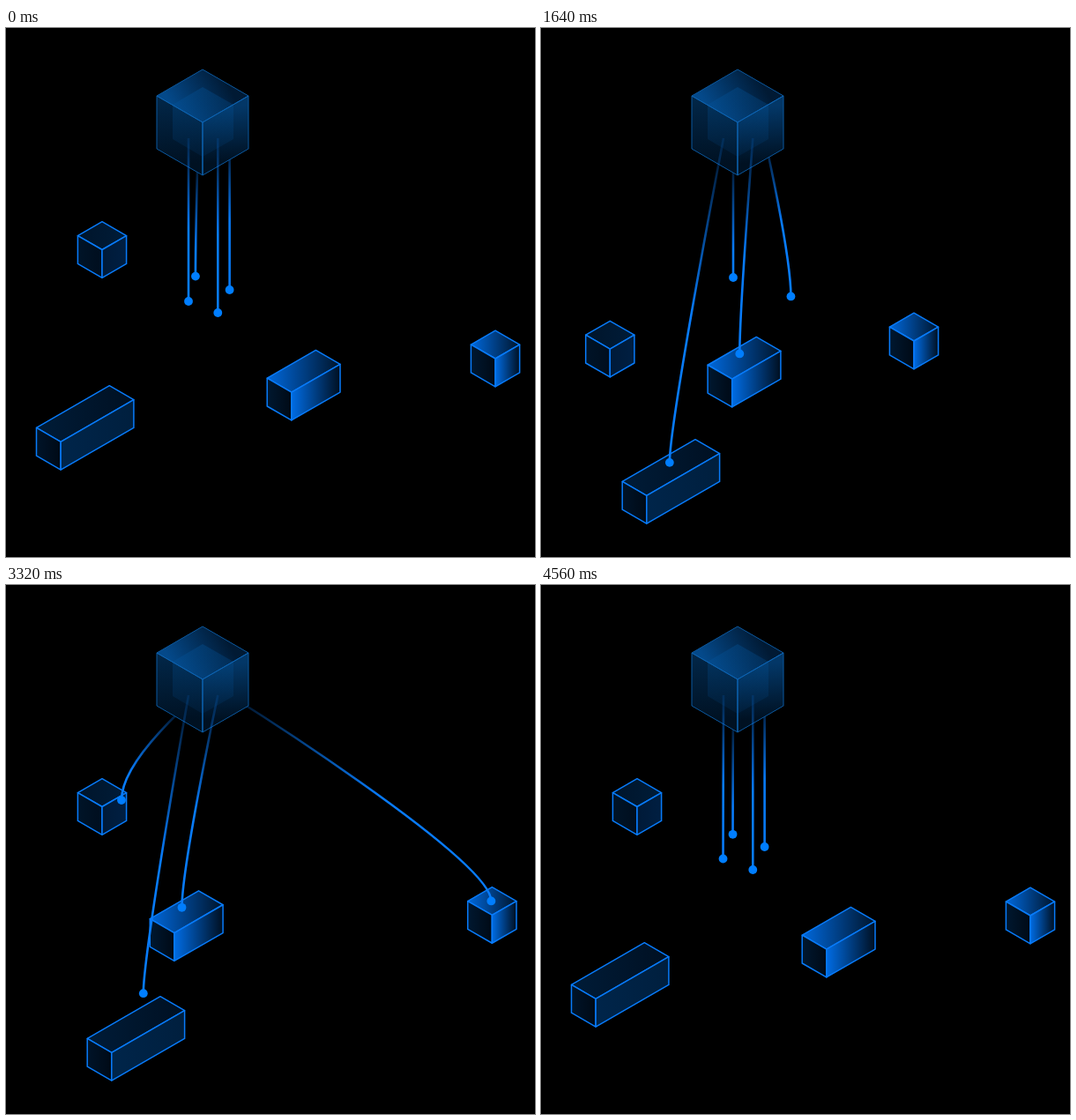
Write an HTML page with a canvas that moves like this. It is 600x600 px and loops after 4.6 s.

```html
<!DOCTYPE html>
<html lang="en">
<head>
<meta charset="utf-8">
<title>Cube with four arms</title>
<style>
  html, body { margin: 0; width: 100%; height: 100%; overflow: hidden; background: #000; }
  canvas { display: block; width: 600px; height: 600px; }
</style>
</head>
<body>
<canvas id="stage" width="600" height="600"></canvas>
<script>
const ctx = document.getElementById('stage').getContext('2d');
const LOOP = 4600;
const BLUE = '#087bfa';
const ROOT_Y = 125;

// Box faces: gradient stops from the left end to the right end
const DIM = { top: ['#00152b', '#001c38'], left: ['#001428', '#000e1e'], right: ['#001a38', '#001f42'] };
const LONG = { top: ['#001c38', '#001022'], left: ['#001429', '#000a16'], right: ['#00254a', '#001f3e'] };
const BRIGHT = { top: ['#0068dc', '#00142a'], left: ['#001830', '#000a16'], right: ['#006ce4', '#000f20'] };

// times: start and end of reach, carry, return (out), then the same (back)
const arms = [
  { rest: [218, 283], fade: [.15, .8], from: [109, 219.7], to: [78.3, 332.3], grip: [-1.7, 13.8],
    cells: 1, skin: DIM, back: true,
    times: [-65, 495, 568, 1018, 1018, 1486, 1965, 2525, 2716, 3166, 3166, 3640] },
  { rest: [253.6, 297], fade: [0, .55], from: [555, 343.2], to: [423, 323.2], grip: [-1, 15.8],
    cells: 1, skin: BRIGHT, back: true,
    times: [96, 656, 686, 1266, 1266, 1800, 2300, 2860, 2880, 3380, 3382, 3902] },
  { rest: [207, 310], fade: [0, .55], from: [117.3, 405.7], to: [175, 466.7], grip: [-31, 31.7],
    cells: 3, skin: LONG,
    times: [326, 976, 1046, 1586, 1586, 2040, 2960, 3480, 3654, 4194, 4194, 4578] },
  { rest: [240.3, 323], fade: [0, .55], from: [351.4, 365.4], to: [218.2, 346.8], grip: [-19, 19],
    cells: 2, skin: BRIGHT,
    times: [640, 1200, 1270, 1810, 1810, 2380, 2836, 3276, 3303, 3863, 3880, 4380] }
];

const mix = (a, b, k) => a.map((v, i) => v + (b[i] - v) * k);

function ramp(t, start, end) {
  const p = Math.min(1, Math.max(0, (t - start) / (end - start)));
  return p < .5 ? 2 * p * p : 1 - 2 * (1 - p) ** 2;
}

function gradient(a, b, colors, stops = [0, 1]) {
  const g = ctx.createLinearGradient(...a, ...b);
  colors.forEach((c, i) => g.addColorStop(stops[i], c));
  return g;
}

function polygon(points, fill, stroke) {
  ctx.beginPath();
  points.forEach(p => ctx.lineTo(...p));
  ctx.closePath();
  ctx.fillStyle = fill;
  ctx.fill();
  if (stroke) {
    ctx.strokeStyle = stroke;
    ctx.stroke();
  }
}

function drawBox([x, y], cells, skin) {
  const w = 27.6, h = 15.9, tall = 31.8;
  const left = [x - w * cells, y + h * cells];
  const right = [x + w, y + h];
  const front = [left[0] + w, left[1] + h];
  const down = p => [p[0], p[1] + tall];
  const across = (a, b, colors) => gradient(a, [b[0], a[1]], colors);
  ctx.lineWidth = 1.5;
  polygon([[x, y], right, front, left], across(left, right, skin.top), BLUE);
  polygon([left, front, down(front), down(left)], across(left, front, skin.left), BLUE);
  polygon([front, right, down(right), down(front)], across(front, right, skin.right), BLUE);
}

function drawHub() {
  const edge = '#0b589f';
  const top = [223, 47], left = [171, 77], right = [275, 77], mid = [223, 107];
  const lowLeft = [171, 137], lowRight = [275, 137], low = [223, 167];
  ctx.lineWidth = 1;
  polygon([top, right, mid, left], gradient([188, 88], [246, 55], ['#04498a', '#011a34']), edge);
  polygon([left, mid, low, lowLeft], gradient([190, 80], [198, 155], ['#022647', '#001122']), edge);
  polygon([mid, right, lowRight, low], gradient([245, 90], [250, 152], ['#033767', '#001122']), edge);
  polygon([[223, 67], [258, 87], [258, 126], [223, 146], [189, 126], [189, 87]],
    gradient([223, 67], [223, 146], ['rgba(4,90,165,.3)', 'rgba(4,80,150,.12)']));
  ctx.strokeStyle = '#0d62b0';
  ctx.beginPath();
  [left, mid, right].forEach(p => ctx.lineTo(...p));
  ctx.moveTo(...mid);
  ctx.lineTo(...low);
  ctx.stroke();
}

// An arm leaves its root straight and arrives at the tip from above
function drawArm({ rest, fade, tip }) {
  const root = [rest[0], ROOT_Y], [x, y] = tip;
  ctx.strokeStyle = gradient(root, tip, ['rgba(8,123,250,.12)', BLUE], fade);
  ctx.lineWidth = 2.6;
  ctx.beginPath();
  ctx.moveTo(...root);
  ctx.bezierCurveTo(...root, x, y - 48, x, y);
  ctx.stroke();
  ctx.fillStyle = '#007eff';
  ctx.beginPath();
  ctx.arc(x, y, 4.9, 0, 2 * Math.PI);
  ctx.fill();
}

function pose(arm, time) {
  const t = time - LOOP >= arm.times[0] ? time - LOOP : time;
  const phase = i => ramp(t, arm.times[2 * i], arm.times[2 * i + 1]);
  const reach = phase(0) - phase(2) + phase(3) - phase(5);
  const box = mix(arm.from, arm.to, phase(1) - phase(4));
  const hold = box.map((v, i) => v + arm.grip[i]);
  return { ...arm, box, tip: mix(arm.rest, hold, reach) };
}

function draw(time) {
  ctx.fillStyle = '#000';
  ctx.fillRect(0, 0, 600, 600);
  const posed = arms.map(arm => pose(arm, time));
  posed.forEach(a => drawBox(a.box, a.cells, a.skin));
  posed.filter(a => a.back).forEach(drawArm);
  drawHub();
  posed.filter(a => !a.back).forEach(drawArm);
}

const begin = performance.now();
function tick() {
  draw((performance.now() - begin) % LOOP);
  requestAnimationFrame(tick);
}
ctx.lineJoin = 'round';
tick();
</script>
</body>
</html>
```
